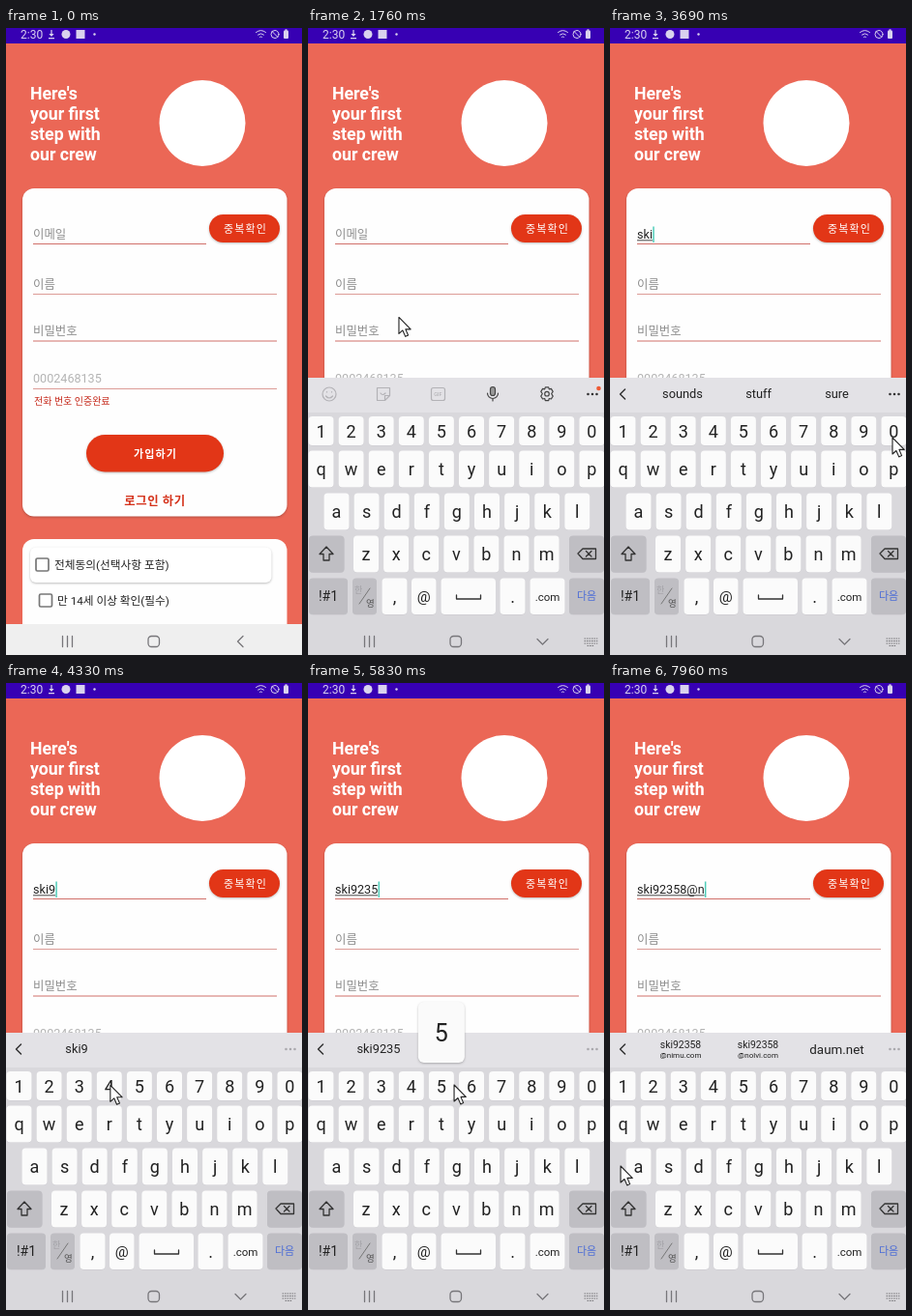
These frames come from a looping animation (306x649 px, 8 s). An HTML page:

```html
<!DOCTYPE html>
<html lang="ko">
<head>
<meta charset="utf-8">
<title>Sign-up form</title>
<style>
html, body { margin: 0; width: 100%; height: 100%; overflow: hidden; background: #eb6756; }
svg { position: fixed; inset: 0; width: 100%; height: 100%; display: block; }
text { font-family: Roboto, "Noto Sans CJK KR", "Noto Sans CJK", sans-serif; white-space: pre; }
.mid { text-anchor: middle; }
.line { fill: none; stroke-linecap: round; stroke-linejoin: round; }
.hint { font-size: 12.4px; fill: #8d8d8d; }
.btn { font-size: 11px; font-weight: 500; letter-spacing: 1.1px; fill: #fff; }
.strong { font-weight: 700; }
.check { font-size: 11.7px; fill: #222; }
.lift { filter: drop-shadow(0 1px 1px rgba(0, 0, 0, .25)); }
</style>
</head>
<body>
<svg viewBox="0 0 306 649" preserveAspectRatio="none">
  <rect width="306" height="649" fill="#eb6756"/>
  <rect width="306" height="16" fill="#3700b3"/>
  <g fill="#d9d2ee">
    <text x="15" y="11" font-size="12">2:30</text>
    <path d="M44 10h6v1.2h-6zM46.4 2h1.2v4h2l-2.6 3-2.6-3h2z"/>
    <circle cx="62" cy="6.5" r="4.5"/>
    <rect x="72.5" y="2" width="9" height="9"/>
    <circle cx="91.5" cy="6.5" r="1.2"/>
    <rect x="287" y="2.5" width="5" height="8.5" rx="1"/>
    <rect x="288.5" y="1.3" width="2" height="2"/>
  </g>
  <g class="line" stroke="#d9d2ee">
    <path d="M258.5 4.5q5-4 10 0M260.5 7q3-2.5 6 0M262.5 9.3q1-1 2 0"/>
    <circle cx="278" cy="6.5" r="4"/><path d="M275.2 3.7l5.6 5.6"/>
  </g>

  <g class="strong" font-size="17.7" fill="#fff">
    <text x="25" y="73.5">Here's</text><text x="25" y="94.5">your first</text>
    <text x="25" y="115.5">step with</text><text x="25" y="136.5">our crew</text>
  </g>
  <circle cx="203" cy="98.5" r="44.5" fill="#fff"/>

  <rect class="lift" x="17" y="166" width="273.5" height="339.5" rx="12" fill="#fefefe"/>
  <g stroke="#d0706a" stroke-width="1">
    <path d="M28 223.5H207M28 324H280"/>
    <path d="M28 275.5H280M28 373.5H280" stroke="#dc9c97"/>
  </g>
  <text id="hint" class="hint" x="28" y="217.5">이메일</text>
  <text id="entry" x="28" y="217.5" font-size="12.6" fill="#222"></text>
  <path id="under" stroke="#333" stroke-width=".9"/>
  <rect id="caret" y="205.5" width="1.5" height="16.5" fill="#4fcdb9"/>
  <text class="hint" x="28" y="269.5">이름</text>
  <text class="hint" x="28" y="318">비밀번호</text>
  <text x="28" y="367" font-size="12.6" fill="#b4b4b4">0002468135</text>
  <text x="29" y="390" font-size="10" fill="#c5281a">전화 번호 인증완료</text>
  <g class="lift" fill="#e23617">
    <rect x="210" y="193" width="73" height="29" rx="14.5"/>
    <rect x="83" y="421" width="142" height="38.5" rx="19.25"/>
  </g>
  <text class="btn mid" x="247.5" y="212">중복확인</text>
  <text class="btn mid strong" x="154.5" y="445">가입하기</text>
  <text class="mid strong" x="154" y="493.5" font-size="12.4" letter-spacing=".6" fill="#d5331c">로그인 하기</text>

  <path d="M17 649V541a12 12 0 0 1 12-12h249.5a12 12 0 0 1 12 12V649z" fill="#fefefe"/>
  <rect class="lift" x="25" y="537.5" width="249.5" height="36.5" rx="6" fill="#fff"/>
  <g fill="none" stroke="#777" stroke-width="1.7">
    <rect x="31" y="549" width="13" height="13" rx="1.5"/>
    <rect x="34.5" y="586" width="13" height="13" rx="1.5"/>
  </g>
  <text class="check" x="50" y="560">전체동의(선택사항 포함)</text>
  <text class="check" x="53" y="597">만 14세 이상 확인(필수)</text>

  <rect id="blank" y="362" width="306" height="260" fill="#fcfcfc"/>
  <rect y="617" width="306" height="32" fill="#efefef"/>

  <g id="board">
    <rect y="362" width="306" height="287" fill="#d9d8dc"/>
    <rect y="362" width="306" height="36" fill="#e3e2e6"/>
    <g id="tools">
      <g class="line" stroke="#b3b2b6" stroke-width="1.2">
        <circle cx="22" cy="379" r="7"/><path d="M18.5 381q3.5 4 7 0M19.5 376.5v.5M24.5 376.5v.5"/>
        <path d="M71.5 372.5h13v8l-5 5h-8zM84.5 380.5h-5v5M75 378q2 3 5 0"/>
        <rect x="127.5" y="372.5" width="14" height="13" rx="2"/>
      </g>
      <text class="mid" x="134.5" y="381" font-size="5.5" fill="#a9a8ac">GIF</text>
      <g class="line" stroke="#444" stroke-width="1.2">
        <rect x="188.5" y="371.5" width="5" height="9" rx="2.5" fill="#999"/>
        <path d="M185.5 378a5.5 5.5 0 0 0 11 0M191 383.5v2.5"/>
        <path d="M245.3 371.8h3.4l.6 2.1 2.1-.5 1.8 3-1.5 2.100 1.500 2.600-1.800 2.900-2.100-.5-.6 2.100h-3.400l-.6-2.100-2.100.5-1.800-2.900 1.500-2.600-1.500-2.100 1.800-3 2.100.5z"/>
        <circle cx="247" cy="378.7" r="2.3"/>
      </g>
      <circle cx="300.5" cy="373" r="2.3" fill="#ee5a35"/>
    </g>
    <path id="back" class="line" d="M15.5 374l-5 5 5 5" stroke="#333" stroke-width="1.5"/>
    <g id="dots"><circle cx="289.5" cy="379" r="1.3"/><circle cx="294" cy="379" r="1.3"/><circle cx="298.5" cy="379" r="1.3"/></g>
    <g id="words" class="mid" fill="#222"></g>
    <g id="keys"></g>
    <g class="line" stroke="#333" stroke-width="1.3">
      <path d="M19 537l-7 7.5h4v6.5h6v-6.5h4z"/>
      <path d="M279 544l5-5h13.5v10.5H284zM287.5 541.5l5.5 5.5M293 541.5l-5.5 5.5"/>
      <path d="M153.5 587v4h25v-4"/>
      <path d="M53 596l11-16" stroke="#777" stroke-width="1"/>
    </g>
    <text x="48" y="585" font-size="9" fill="#a3a2a7">한</text>
    <text x="60" y="599" font-size="9.5" fill="#555">영</text>
  </g>

  <g class="line" stroke="#77767a" stroke-width="1.3">
    <path d="M58.5 629.5v11M63.5 629.5v11M68.5 629.5v11"/>
    <rect x="147" y="629.5" width="11.5" height="11" rx="3.5"/>
    <path id="navBack" d="M245 629.5l-5.5 5.5 5.5 5.5"/>
    <g id="navHide">
      <path d="M237 632.5l5.5 5.500 5.500-5.500"/>
      <path d="M286 632h13M286 634.5h13M286 637h13M289 639.5h7" stroke-width="1" stroke-dasharray=".8 1.7"/>
    </g>
  </g>

  <g id="popup">
    <rect class="lift" x="-24" y="-87" width="48" height="63" rx="6" fill="#fafafa"/>
    <text class="mid" y="-46" font-size="25" fill="#222"></text>
  </g>
  <circle id="press" r="12" fill="#fff23c" fill-opacity=".8"/>
  <path id="mouse" d="M0 0v17l3.900-3.500 2.800 6.400 2.900-1.300-2.700-6.200h5.300z" fill="#fff" stroke="#222" stroke-width="1.1" stroke-linejoin="round"/>
</svg>
<script>
const LOOP = 8000;
const NAME = 'ski92358';
const ENTRY = NAME + '@n';
const TYPED = [2530, 3010, 3310, 4110, 4750, 5110, 5830, 6290, 6990, 7560];
const PRESSES = [810, ...TYPED.map(t => t - 230)];
const FOCUS = 1060;

// time, x, y of the pointer tip
const PATH = [
  [130, 185, 306], [210, 118, 129], [350, 118, 129], [430, 118, 109], [790, 109, 209],
  [1530, 109, 209], [2150, 61, 498], [2470, 61, 498], [2660, 216, 498], [2690, 216, 498],
  [2770, 246, 498], [2950, 246, 498], [3060, 231, 456], [3250, 231, 456], [3650, 292, 424],
  [3720, 292, 424], [3830, 263, 417], [4060, 263, 417], [4480, 45, 416], [4700, 45, 416],
  [4860, 71, 415], [5350, 71, 415], [5560, 137, 416], [5770, 137, 416], [6020, 231, 416],
  [6300, 231, 416], [6640, 113, 586], [6950, 113, 586], [7280, 216, 543], [7500, 216, 543],
  [7940, 11, 500]
];

const $ = id => document.getElementById(id);
const show = (id, on) => $(id).setAttribute('visibility', on ? 'visible' : 'hidden');
const place = (id, x, y) => $(id).setAttribute('transform', `translate(${x} ${y})`);
const clamp = v => Math.min(1, Math.max(0, v));

// keyboard
const keyAt = {};
let keys = '';
function addKey(label, x, y, w, h, fill = '#fbfbfb', size = 18, ink = '#222') {
  const cx = x + w / 2, cy = y + h / 2;
  keyAt[label] = [cx, cy];
  keys += `<rect x="${x}" y="${y + .6}" width="${w}" height="${h}" rx="4" fill="#c9c8cd"/>
    <rect x="${x}" y="${y}" width="${w}" height="${h}" rx="4" fill="${fill}"/>
    <text class="mid" x="${cx}" y="${cy + size * .37}" font-size="${size}" fill="${ink}">${label}</text>`;
}
const ROWS = [['1234567890', 13.5, 402, 30], ['qwertyuiop', 13.5, 437.5, 38],
  ['asdfghjkl', 29.5, 481.5, 38], ['zxcvbnm', 60, 525.5, 38]];
for (const [chars, x, y, h] of ROWS)
  [...chars].forEach((c, i) => addKey(c, x + i * 31.1 - 13, y, 26, h));
const DARK = '#bfbec3';
addKey('', 1, 525.5, 36.5, 38, DARK);
addKey('', 270, 525.5, 36, 38, DARK);
addKey('!#1', 1, 569.5, 40, 37.5, DARK, 14);
addKey('', 46, 569.5, 25, 37.5, DARK);
addKey(',', 76.5, 569.5, 26, 37.5);
addKey('@', 107, 569.5, 25.5, 37.5, '#fbfbfb', 15.5);
addKey('', 137.5, 569.5, 56.5, 37.5);
addKey('.', 198.5, 569.5, 26, 37.5);
addKey('.com', 229.5, 569.5, 36, 37.5, '#fbfbfb', 11.5);
addKey('다음', 270, 569.5, 36, 37.5, DARK, 11, '#4a6bd6');
$('keys').innerHTML = keys;

const word = (s, x, y = 383, size = 12.8) =>
  `<text class="mid" x="${x}" y="${y}" font-size="${size}">${s}</text>`;
const address = (host, x) => word(NAME, x, 377.5, 10.4) + word('@' + host, x, 388, 8);

function suggestions(t, n) {
  if (t < 2760) return '';
  if (n < 4) return word('sounds', 75) + word('stuff', 153.5) + word('sure', 234.5);
  if (n < 10) return word(ENTRY.slice(0, n), 73);
  return address('nimu.com', 73) + address('nolvi.com', 153) + word('daum.net', 234.5, 383.5, 13.4);
}

function pointer(t) {
  const i = PATH.findIndex(p => p[0] > t);
  if (i < 0) return PATH[PATH.length - 1].slice(1);
  if (i === 0) return PATH[0].slice(1);
  const [a, b] = [PATH[i - 1], PATH[i]];
  const u = (t - a[0]) / (b[0] - a[0]);
  const k = u * u * (3 - 2 * u);
  return [a[1] + (b[1] - a[1]) * k, a[2] + (b[2] - a[2]) * k];
}

let lastWords;
function draw(t) {
  const n = TYPED.filter(s => s <= t).length;
  const lastEdit = n ? TYPED[n - 1] : FOCUS;

  // entry field
  const entry = $('entry');
  const value = ENTRY.slice(0, n);
  if (entry.textContent !== value) entry.textContent = value;
  const end = 28 + (n ? entry.getComputedTextLength() : 0);
  show('hint', !n);
  $('under').setAttribute('d', n ? `M28 219.8H${end}` : '');
  $('caret').setAttribute('x', end + .3);
  show('caret', t >= FOCUS && (t - lastEdit) % 1000 < 500);

  // keyboard entrance
  const p = clamp((t - FOCUS) / 320);
  show('blank', p > 0);
  $('board').setAttribute('opacity', p);
  place('board', 0, 287 * (1 - p) ** 3);
  show('navBack', p === 0);
  show('navHide', p > 0);

  // suggestion strip
  const html = suggestions(t, n);
  if (html !== lastWords) $('words').innerHTML = lastWords = html;
  show('tools', !html);
  show('back', html);
  $('dots').setAttribute('fill', n < 4 ? '#333' : '#aaa9ad');

  // key preview
  const char = ENTRY[n - 1];
  const previewed = n > 0 && char !== '@' && t - lastEdit < 190;
  show('popup', previewed);
  if (previewed) {
    place('popup', ...keyAt[char]);
    $('popup').lastElementChild.textContent = char;
  }

  // pointer
  const [x, y] = pointer(t);
  place('mouse', x, y);
  place('press', x - .8, y - .5);
  show('mouse', t >= 130);
  show('press', PRESSES.some(s => t >= s && t < s + 160));
}

const start = performance.now();
function tick() {
  draw((performance.now() - start) % LOOP);
  requestAnimationFrame(tick);
}
tick();
</script>
</body>
</html>
```
